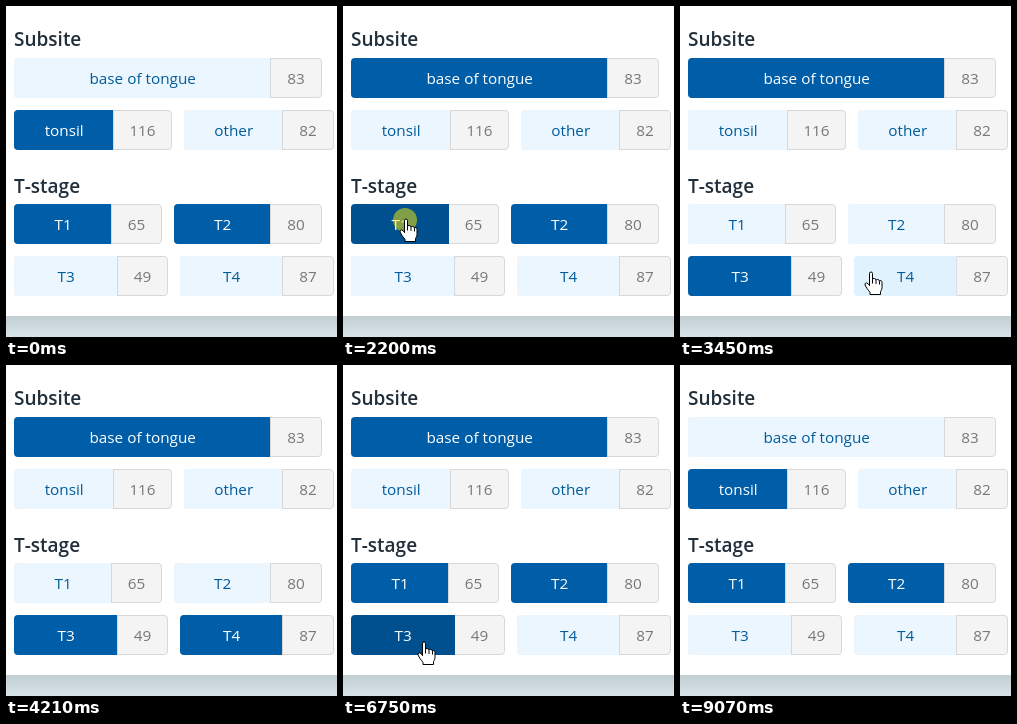
Write an HTML page that moves like this. It is 331 px wide and 331 px high and loops after 9140 ms.

```html
<!DOCTYPE html>
<html lang="en">
<head>
<meta charset="utf-8">
<title>Filter buttons</title>
<style>
html, body { margin: 0; width: 100%; height: 100%; overflow: hidden; background: #fff; }
svg { display: block; }
text { font: 15.3px "Open Sans", "Noto Sans", sans-serif; text-anchor: middle; }
.head { font-size: 19px; font-weight: 600; font-kerning: none; text-anchor: start; fill: #212f3b; }
.count { fill: #777; }
</style>
</head>
<body>
<svg id="stage" width="331" height="331" viewBox="0 0 331 331">
  <defs>
    <linearGradient id="shade" x2="0" y2="1">
      <stop stop-color="#c3ced3"/>
      <stop offset="1" stop-color="#d8e4e9"/>
    </linearGradient>
  </defs>
  <rect width="331" height="331" fill="#fff"/>
  <rect y="310" width="331" height="21" fill="url(#shade)"/>
  <g id="panel"></g>
  <circle id="ring" r="12" fill="#fe0" fill-opacity=".5"/>
  <g id="hand" stroke="#000" stroke-linejoin="round">
    <path fill="#fff" d="M-2 2Q-2 .5 -.5 .5T1 2V8Q1 7 2.7 7T4.5 8.7Q4.8 7.8 6.2 7.9T8 9.6Q8.3 8.8 9.4 9.1T10.5 11V16Q10.5 18 9 20V23H-1.5V21Q-2.5 19.5 -4.5 17L-6.5 13.5Q-6.8 11.5 -5 11.4Q-3.5 11.6 -2 14Z"/>
    <path fill="none" d="M-2 2V14M1 8V12M4.5 8.7V12.5M8 9.6V13"/>
  </g>
</svg>
<script>
const LOOP = 9140, FADE = 80, PRESS = 75;
const WAIT = 120, HOLD = 40;            // rest before and after each click
const LEFT = 8, GAP = 12, HEIGHT = 40;
const $ = id => document.getElementById(id);
const clamp = v => Math.max(0, Math.min(1, v));

// rows of buttons: label, count, label width, whole width, selected at start
const groups = [
  { title: "Subsite", y: 40, rows: [
    [["base of tongue", 83, 256, 308, 0]],
    [["tonsil", 116, 99, 158, 1], ["other", 82, 98, 150, 0]]] },
  { title: "T-stage", y: 186.5, rows: [
    [["T1", 65, 97, 148, 1], ["T2", 80, 96, 148, 1]],
    [["T3", 49, 103, 154, 0], ["T4", 87, 102, 154, 0]]] }
];

// pointer trips: time, x, y; every stop between the ends is a click
const trips = [
  [[200, 258, 291], [880, 112, 74], [1540, 57, 124], [2270, 63, 214],
   [2700, 205, 214], [3240, 90, 267], [3650, 222, 267], [4350, 285, 335]],
  [[5270, 181, 293], [5730, 56, 213], [6120, 205, 218], [6450, 215, 271],
   [6870, 81, 278], [7500, 58, 125], [7890, 108, 68], [8410, 240, 340]]
];
const clicks = trips.flatMap(trip => trip.slice(1, -1));
const buttons = [];

function pointer(t) {
  for (const trip of trips) {
    const i = trip.findIndex(stop => stop[0] > t);
    if (i < 1) continue;
    const [t0, x0, y0] = trip[i - 1], [t1, x1, y1] = trip[i];
    const u = clamp((t - t0 - HOLD) / (t1 - t0 - HOLD - WAIT));
    const s = u * u * (3 - 2 * u);
    return [x0 + (x1 - x0) * s, y0 + (y1 - y0) * s];
  }
  return null;
}

function inside(b, [px, py]) {
  return px >= b.x && px < b.x + b.w && py >= b.y && py < b.y + HEIGHT;
}

// share of the last FADE ms spent over the button
function hover(b, t) {
  const steps = 8;
  let n = 0;
  for (let i = 0; i < steps; i++) {
    const p = pointer(t - i * FADE / steps);
    if (p && inside(b, p)) n++;
  }
  return n / steps;
}

function selected(b, t) {
  return b.clicks.reduce((s, [time]) => s + (1 - 2 * s) * clamp((t - time) / FADE), b.on);
}

const mix = (a, b, k) => a.map((v, i) => v + (b[i] - v) * k);
const rgb = c => `rgb(${c.map(Math.round)})`;
const OFF = [235, 246, 255], OFF_HOVER = [208, 235, 255];
const ON = [0, 94, 168], ON_HOVER = [0, 80, 143];
const INK = [0, 91, 153], WHITE = [255, 255, 255];
const LINE = "#d8d8d8";

function add(tag, attrs, text = "") {
  const el = document.createElementNS("http://www.w3.org/2000/svg", tag);
  for (const k in attrs) el.setAttribute(k, attrs[k]);
  el.textContent = text;
  return $("panel").appendChild(el);
}

function addButton([label, count, w, full, on], x, y) {
  const b = { x, y, w, on };
  b.clicks = clicks.filter(([, px, py]) => inside(b, [px, py]));
  add("rect", { x: x + .5, y: y + .5, width: full - 1, height: HEIGHT - 1, rx: 3.5, fill: "#f4f4f4", stroke: LINE });
  b.face = add("path", { d: `M${x + w + 1} ${y}H${x + 4}q-4 0 -4 4v32q0 4 4 4H${x + w + 1}z` });
  b.edge = add("rect", { x: x + w, y, width: 1, height: HEIGHT, fill: LINE });
  b.text = add("text", { x: x + w / 2 + .7, y: y + 26 }, label);
  add("text", { class: "count", x: x + (w + full) / 2, y: y + 26 }, count);
  buttons.push(b);
}

for (const { title, y, rows } of groups) {
  add("text", { class: "head", x: LEFT, y }, title);
  rows.forEach((row, i) => {
    let x = LEFT;
    for (const item of row) {
      addButton(item, x, Math.floor(y) + GAP + i * (HEIGHT + GAP));
      x += item[3] + GAP;
    }
  });
}

function draw(t) {
  for (const b of buttons) {
    const h = hover(b, t), s = selected(b, t);
    b.face.setAttribute("fill", rgb(mix(mix(OFF, OFF_HOVER, h), mix(ON, ON_HOVER, h), s)));
    b.edge.setAttribute("opacity", 1 - h);
    b.text.setAttribute("fill", rgb(mix(INK, WHITE, s)));
  }
  const p = pointer(t);
  const pressed = p && clicks.some(([time]) => Math.abs(t - time) < PRESS);
  $("hand").style.display = p ? "" : "none";
  $("ring").style.display = pressed ? "" : "none";
  if (!p) return;
  const [x, y] = p.map(Math.round);
  $("hand").setAttribute("transform", `translate(${x + .5} ${y - 1.5})`);
  $("ring").setAttribute("transform", `translate(${x - 1} ${y})`);
}

const start = performance.now();
function frame() {
  draw((performance.now() - start) % LOOP);
  requestAnimationFrame(frame);
}
frame();
</script>
</body>
</html>
```
